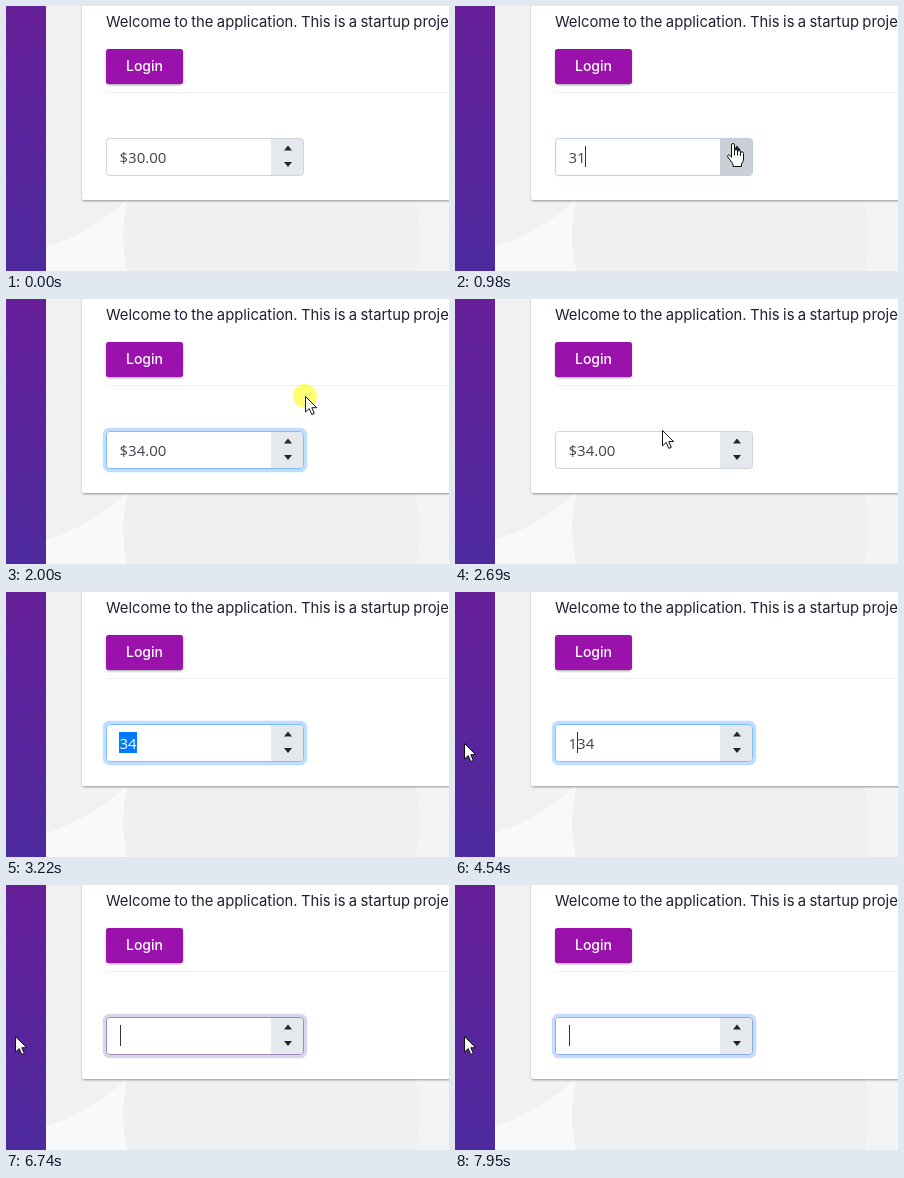
An HTML page that plays this animation: 443 by 265 pixels, repeating every 8000 ms.

```html
<!DOCTYPE html>
<html lang="en">
<head>
<meta charset="utf-8">
<title>Numeric input</title>
<style>
html, body { margin: 0; width: 100%; height: 100%; overflow: hidden; background: #f1f1f1; }
svg { display: block; width: 443px; height: 265px; }
.ui { font-family: Inter, Roboto, sans-serif; }
.intro { font-size: 14.8px; word-spacing: -.8px; fill: #1d2030; }
.value { font: 15px "Open Sans", "Noto Sans", sans-serif; fill: #3f454d; }
</style>
</head>
<body>
<svg viewBox="0 0 443 265">
  <defs>
    <linearGradient id="side" x1="0" y1="0" x2="0" y2="1">
      <stop offset="0" stop-color="#661f99"/>
      <stop offset="1" stop-color="#4d2a9e"/>
    </linearGradient>
    <filter id="soft" x="-10%" y="-10%" width="120%" height="130%">
      <feGaussianBlur stdDeviation="1.2"/>
    </filter>
  </defs>

  <rect width="443" height="265" fill="#f1f1f1"/>
  <path d="M40 241Q85 227 120 194H140V265H40Z" fill="#f9f9f9"/>
  <rect x="400" y="190" width="43" height="75" fill="#f4f4f4"/>
  <circle cx="265.500" cy="230" r="148.500" fill="#f0f0f0"/>
  <rect width="40" height="265" fill="url(#side)"/>

  <rect x="76.500" y="-10" width="400" height="205" rx="2" fill="#000" opacity=".4" filter="url(#soft)"/>
  <rect x="76" y="-10" width="400" height="204" rx="2" fill="#fff"/>
  <text class="ui intro" x="100" y="21">Welcome to the application. This is a startup project</text>
  <path d="M100 86.500H443" stroke="#f0f0f0"/>
  <rect x="100.500" y="44" width="76" height="35" rx="3" fill="#000" opacity=".4" filter="url(#soft)"/>
  <rect x="100" y="43" width="77" height="35" rx="2.500" fill="#9a12ab"/>
  <text class="ui" x="138.500" y="65" font-size="14" font-weight="500" fill="#fff" text-anchor="middle">Login</text>

  <rect id="ring" fill="none"/>
  <rect x="100.500" y="132.500" width="197" height="37" rx="3" fill="#fff"/>
  <path id="spin" d="M265 133H295Q297 133 297 135V167Q297 169 295 169H265Z"/>
  <path d="M278 144.500H286L282 139.500ZM278 156H286L282 161Z" fill="#212529"/>
  <rect id="border" x="100.500" y="132.500" width="197" height="37" rx="3" fill="none"/>

  <rect id="sel" y="140" height="21" fill="#007bff"/>
  <text class="value" x="113.500" y="157"><tspan id="plain"></tspan><tspan id="picked" fill="#fff"></tspan></text>
  <rect id="caret" y="140" width="1" height="21" fill="#30353a"/>

  <g id="mouse">
    <circle id="press" r="12" fill="#ff0" opacity=".55"/>
    <path id="arrow" d="M.5 .5V16L4.200 12.600L6.800 18.500L9.300 17.400L6.800 11.700H11.700Z" fill="#fff" stroke="#111" stroke-linejoin="round"/>
    <g id="hand" stroke="#111" stroke-linejoin="round" stroke-linecap="round">
      <path d="M-.5 14V2Q-.5 .5 1 .5T2.500 2V8Q2.500 6.500 4 6.500T5.500 8V9Q5.500 7.500 7 7.500T8.500 9V10Q8.500 8.800 10 8.800T11.500 10.500V16Q11.500 19 9.500 21V23.500H1V21L-4.200 14Q-5 12.500-3.500 11.800Q-2.500 11.600-.5 14Z" fill="#fff"/>
      <path d="M2.500 8V12M5.500 9V12M8.500 10V12.500" fill="none"/>
    </g>
    <path id="beam" d="M-3 -8.500H-1L0 -7.500L1 -8.500H3M0 -7.500V7.500M-3 8.500H-1L0 7.500L1 8.500H3" fill="none" stroke="#222"/>
  </g>
</svg>
<script>
const LOOP = 8000;
const ids = ["ring", "spin", "border", "sel", "plain", "picked", "caret", "mouse", "press", "arrow", "hand", "beam"];
const el = Object.fromEntries(ids.map(id => [id, document.getElementById(id)]));

const ramp = (t, a, b) => Math.min(1, Math.max(0, (t - a) / (b - a)));
const ease = p => p * p * (3 - 2 * p);
const lerp = (a, b, p) => a + (b - a) * p;
const mix = (a, b, p) => `rgb(${a.map((v, i) => Math.round(lerp(v, b[i], p)))})`;
const within = (t, spans) => spans.some(([a, b]) => t >= a && t < b);
const last = (t, steps) => steps.filter(s => s[0] <= t).pop();
const show = (node, on) => node.setAttribute("visibility", on ? "visible" : "hidden");
const set = (node, attrs) => Object.entries(attrs).forEach(([k, v]) => node.setAttribute(k, v));

const GREY = [206, 212, 218], BLUE = [128, 189, 255], RED = [220, 53, 69], GLOW = [0, 123, 255];

const values = [
  [0, "$30.00"], [930, "31"], [1310, "32"], [1460, "33"], [1690, "34"],
  [1960, "$34.00"], [2870, "34"], [4080, "134"], [5550, "34"], [5790, "4"], [6190, ""]
];
const carets = [
  [0, 0], [930, 130], [1960, 0], [3850, 113], [4080, 122], [4610, 0], [5090, 122],
  [5550, 113], [6190, 0], [6690, 114], [7250, 0], [7620, 114]
];
const presses = [[890, 970], [1310, 1390], [1460, 1610], [1690, 1760], [1950, 2070], [2870, 3220]];

// time, x, y of the pointer
const path = [
  [360, 424, 256], [850, 277, 137], [1760, 277, 137], [1930, 299, 97],
  [2500, 299, 97], [2830, 150, 152], [2920, 150, 152], [3150, 64, 162]
];

function pointer(t) {
  if (t >= 4540) return [9, 151];
  const i = path.findLastIndex(p => p[0] <= t);
  const a = path[i], b = path[i + 1];
  if (!b) return a.slice(1);
  const p = ease(ramp(t, a[0], b[0]));
  return [lerp(a[1], b[1], p), lerp(a[2], b[2], p)];
}

function drawField(t, hover) {
  const focus = ramp(t, 945, 1110) - ramp(t, 2065, 2150) + ramp(t, 2870, 3020);
  const bad = ramp(t, 6650, 6880) - ramp(t, 7200, 7600) + ramp(t, 7900, 8300);
  const edge = BLUE.map((v, i) => lerp(v, RED[i], bad));
  const spread = 3.2 * focus;
  set(el.border, { stroke: mix(GREY, edge, focus) });
  set(el.ring, {
    x: 100 - spread / 2, y: 132 - spread / 2,
    width: 198 + spread, height: 38 + spread, rx: 3.5 + spread / 2,
    stroke: mix(GLOW, RED, bad), "stroke-width": spread, "stroke-opacity": .25 * focus
  });
  el.spin.setAttribute("fill", hover ? "#cbd0d8" : "#e5e8ec");
}

function drawValue(t, x) {
  const text = last(t, values)[1];
  let from = text.length;
  if (t >= 2920 && t < 3850) from = t >= 3150 || x < 118 ? 0 : x < 127 ? 1 : 2;
  el.plain.textContent = text.slice(0, from);
  el.picked.textContent = text.slice(from);
  set(el.sel, { x: 113 + 9 * from, width: 9 * (text.length - from) });
  const caret = last(t, carets)[1];
  show(el.caret, caret);
  el.caret.setAttribute("x", caret);
}

function draw(t) {
  const on = within(t, [[360, 3220], [4540, LOOP]]);
  const [x, y] = on ? pointer(t) : [0, 0];
  const inside = on && x > 100 && x < 298 && y > 132 && y < 170;
  const hover = inside && x > 265;
  const beam = inside && !hover || t > 2830 && t < 3220;
  el.mouse.setAttribute("transform", `translate(${x.toFixed(1)} ${y.toFixed(1)})`);
  show(el.press, on && within(t, presses));
  show(el.hand, hover);
  show(el.beam, on && beam);
  show(el.arrow, on && !hover && !beam);
  drawField(t, hover);
  drawValue(t, x);
}

function tick() {
  draw(performance.now() % LOOP);
  requestAnimationFrame(tick);
}
tick();
</script>
</body>
</html>
```
